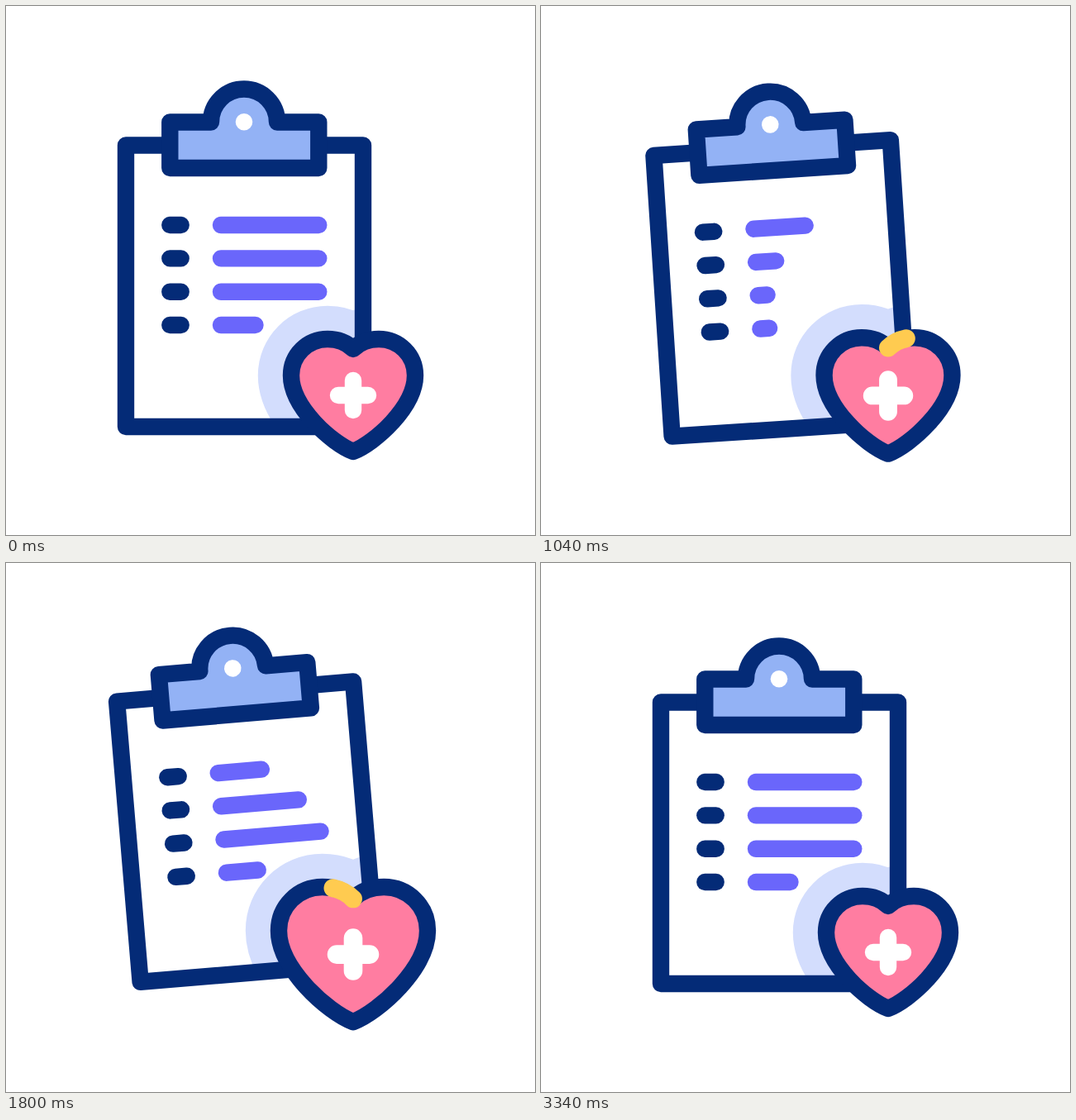
Animation of 640x640 px, one loop 3.6 s. Source, as an HTML page:

```html
<!DOCTYPE html>
<html lang="en">
<head>
<meta charset="utf-8">
<title>Health checklist</title>
<style>
  html, body { margin: 0; height: 100%; overflow: hidden; background: #fff; }
  svg { display: block; width: 100vw; height: 100vh; }
  path, line, rect { fill: none; stroke: #042b77; stroke-width: 20.4; stroke-linecap: round; stroke-linejoin: round; }
  .bar { stroke: #6a66fb; }
  #clip { fill: #93b2f5; }
  #halo { stroke: #d3ddfd; }
  #face { fill: #ff7da1; }
  .spark { stroke: #ffcb50; }
  #cross { stroke: #fff; }
</style>
</head>
<body>
<svg viewBox="0 0 640 640">
  <defs>
    <clipPath id="paper"><rect id="sheet" x="145" y="168.5" width="287" height="340.5"/></clipPath>
  </defs>
  <g clip-path="url(#paper)"><g class="beat"><path id="halo" class="heart"/></g></g>
  <g id="board">
    <rect x="145" y="168.5" width="287" height="340.5"/>
    <path id="clip" d="M198.3 140.5H248A40 40 0 0 1 328 140.5H378.3V196H198.3Z"/>
    <circle cx="288" cy="140.3" r="10.3" fill="#fff"/>
    <g id="rows"></g>
  </g>
  <g class="beat">
    <path id="face" class="heart"/>
    <path class="heart spark"/>
    <path class="heart spark"/>
  </g>
  <path id="cross" d="M-18 0H18M0-18V18"/>
</svg>
<script>
const LOOP = 3600, PIVOT_Y = 458;
const HEART = 'M420 415C428 407 439 403 451 403C475.5 403 495 422.5 495 447' +
  'C495 485 446 529 420 539C394 529 345 485 345 447C345 422.5 364.5 403 389 403C401 403 412 407 420 415Z';
const all = s => [...document.querySelectorAll(s)];
const byId = id => document.getElementById(id);

const ease = x => (1 - Math.cos(Math.PI * Math.min(1, Math.max(0, x)))) / 2;

// Eased value at time t through [time, value] keys
function track(keys, t) {
  let v = keys[0][1];
  for (let i = 1; i < keys.length; i++) {
    const [t0, v0] = keys[i - 1], [t1, v1] = keys[i];
    if (t >= t0) v = v0 + (v1 - v0) * ease((t - t0) / (t1 - t0));
  }
  return v;
}

const TILT = [[0, 0], [800, -11], [1375, 8.4], [1860, -5.3], [2333, 2.7], [2690, 0]];
const HOP = [[0, 0], [660, -51], [1265, 26], [1780, -13.5], [2200, 0]];
const BEAT = [[0, 0], [600, 1], [1200, 0], [1800, 1], [2400, 0]];
const BAR = [[0, 1], [700, .09], [1400, 1], [2100, .09], [2800, 1]];
const SPARK_STARTS = [0, 915], SPARK_TIME = 850, SPARK_LAG = 160, BAR_LAG = 180, CROSS_LAG = 160;

const rowWidths = [118.3, 118.3, 118.3, 41.5];
byId('rows').innerHTML = rowWidths.map((w, i) => {
  const y = 265 + i * 40.35;
  return `<line x1="198.3" x2="211.7" y1="${y}" y2="${y}"/><line class="bar" x1="260" y1="${y}" y2="${y}"/>`;
}).join('');

const bars = all('.bar'), sparks = all('.spark'), beats = all('.beat');
all('.heart').forEach(p => { p.setAttribute('d', HEART); p.setAttribute('pathLength', 1); });

function draw(t) {
  const pose = `translate(0 ${track(HOP, t)}) rotate(${track(TILT, t)} 288 304.5)`;
  byId('board').setAttribute('transform', pose);
  byId('sheet').setAttribute('transform', pose);

  bars.forEach((bar, i) => bar.setAttribute('x2', 260 + rowWidths[i] * track(BAR, t - i * BAR_LAG)));

  // The heart grows while its outline keeps its weight
  const k = 1 + .2 * track(BEAT, t);
  beats.forEach(g => g.setAttribute('transform',
    `translate(420 ${PIVOT_Y}) scale(${k}) translate(-420 ${-PIVOT_Y})`));
  byId('halo').style.strokeWidth = 80.4 / k;
  byId('face').style.strokeWidth = 20.4 / k;

  sparks.forEach((spark, i) => {
    const age = t - SPARK_STARTS[i];
    const head = ease(age / SPARK_TIME), tail = ease((age - SPARK_LAG) / SPARK_TIME);
    spark.style.display = head - tail > .0005 ? '' : 'none';
    spark.style.strokeWidth = 22 / k;
    spark.style.strokeDasharray = `0 ${tail} ${head - tail} 2`;
    // A leading empty dash would paint a cap at the path start
    if (tail > 0) {
      spark.style.strokeDasharray = `${head - tail} 2`;
      spark.style.strokeDashoffset = -tail;
    } else {
      spark.style.strokeDasharray = `${head} 2`;
      spark.style.strokeDashoffset = 0;
    }
  });

  const c = 1 + .13 * track(BEAT, t - CROSS_LAG);
  byId('cross').setAttribute('transform', `translate(420 ${PIVOT_Y + 13 * k}) scale(${c})`);
}

function tick() {
  draw(performance.now() % LOOP);
  requestAnimationFrame(tick);
}
tick();
</script>
</body>
</html>
```
